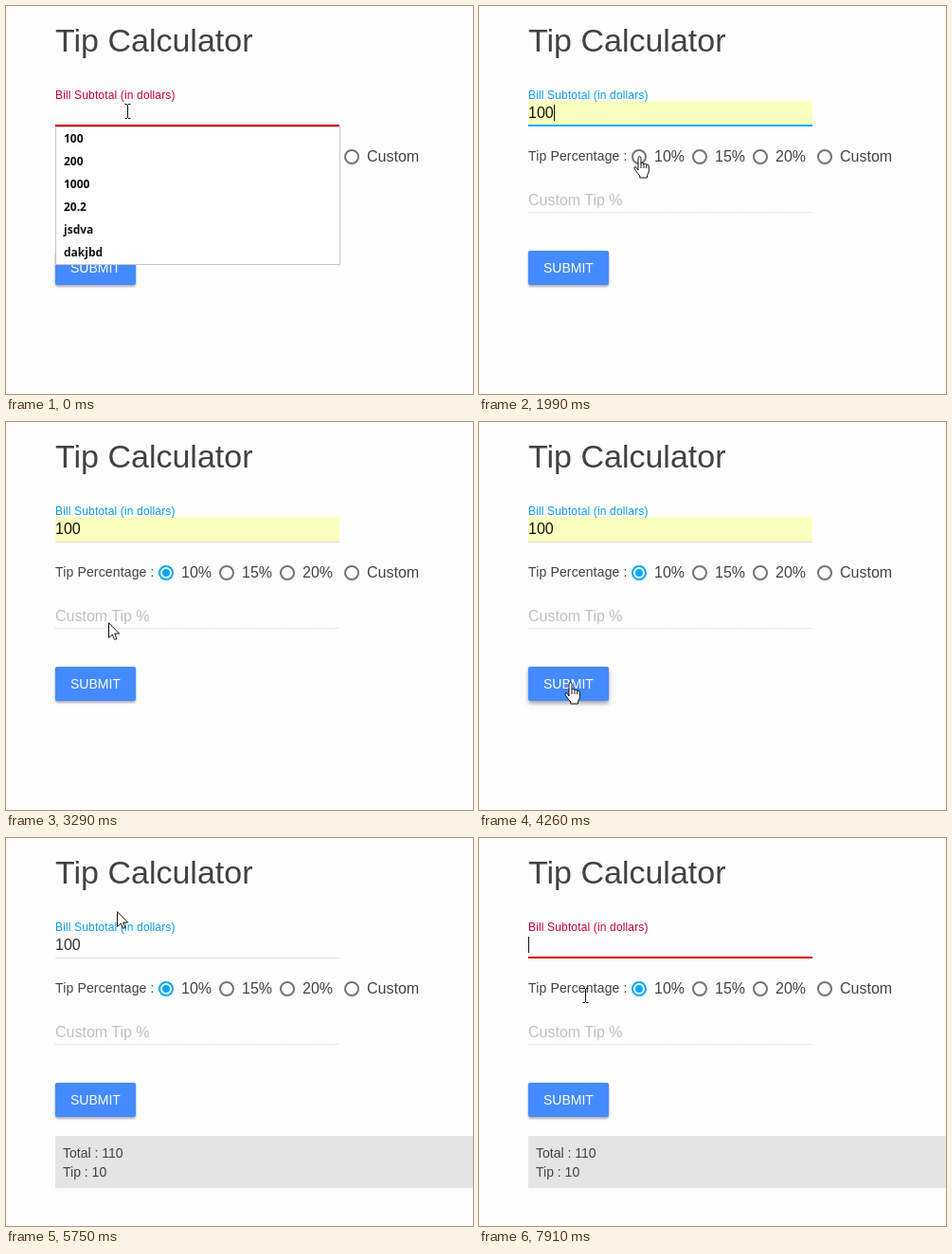
Animation of 493 by 409 pixels, one loop 8 s. Source, as an HTML page:

```html
<!DOCTYPE html>
<html lang="en">
<head>
<meta charset="utf-8">
<title>Tip Calculator</title>
<style>
  html, body { margin: 0; width: 100%; height: 100%; overflow: hidden; background: #fdfdfd; }
  svg { display: block; font: 16px "Liberation Sans", Arial, sans-serif; fill: #424242; }
  .title { font-size: 34px; }
  .label { font-size: 12px; letter-spacing: .15px; }
  .small { font-size: 14px; }
  .spaced { letter-spacing: .15px; }
  .hint { fill: #bfbfbf; }
  .menu { font: bold 12px "Open Sans", "Noto Sans", sans-serif; fill: #111; }
  .button { fill: #448aff; filter: drop-shadow(0 2px 1px #0004) drop-shadow(0 0 1px #0002); }
  .pressed { filter: drop-shadow(0 3px 2px #0004) drop-shadow(0 0 1px #0003); }
</style>
</head>
<body>
<svg id="stage" width="493" height="409" viewBox="0 0 493 409"></svg>
<script>
const LOOP = 8000, BLUE = '#03a9f4', RED = '#d50000';
const stage = document.getElementById('stage');

// Each track lists [start time, ...values]; a value holds until the next start.
const pointer = [
  [0, 'beam', 128, 111], [1450, 'beam', 140, 117], [1570, 'arrow', 154, 132], [1690, 'arrow', 165, 145],
  [1840, 'hand', 161, 152], [1990, 'hand', 163, 158], [2540, 'arrow', 146, 176], [2660, 'arrow', 128, 186],
  [2780, 'arrow', 117, 191], [2930, 'arrow', 114, 195], [3050, 'arrow', 111, 202], [3170, 'arrow', 109, 208],
  [3290, 'arrow', 108, 211], [3410, 'hand', 92, 280], [3560, 'hand', 90, 288], [3840, 'hand', 89, 275],
  [3990, 'hand', 90, 274], [4410, 'arrow', 96, 274], [4530, 'hand', 90, 274], [5210, 'hand', 85, 274],
  [5360, 'arrow', 52, 225], [5480, 'arrow', 40, 184], [5630, 'arrow', 85, 46], [5750, 'arrow', 117, 77],
  [5900, 'arrow', 129, 98], [6050, 'beam', 130, 111], [6170, 'beam', 129, 111], [7910, 'beam', 112, 166]
];
const labelColor = [[0, '#c4003c'], [930, '#3f86c4'], [1050, '#0b9ce6'], [7520, '#8a4090'], [7640, '#c4003c']];
const bar = [
  [0, RED, 52, 352], [930, '#2090c0', 52, 352], [1050, BLUE, 52, 352], [2270, BLUE, 110, 290],
  [2390, BLUE, 187, 199], [2540], [6850, BLUE, 132, 268], [7000, BLUE, 52, 352],
  [7520, '#8a4a70', 52, 352], [7640, RED, 52, 352]
];
const caret = [[0], [930, 79], [1450], [1840, 79], [2270], [6850, 79], [7000], [7520, 52]];
const menu = [
  [0, ['100', '200', '1000', '20.2', 'jsdva', 'dakjbd']], [930], [7250, ['100', '1000']], [7520]
];
const tracks = [pointer, labelColor, bar, caret, menu, [[4140], [4410], [4530], [460]]];
const times = [...new Set(tracks.flat().map(step => step[0]))].sort((a, b) => a - b);

const at = (track, t) => track.findLast(step => step[0] <= t).slice(1);
const rect = (x, y, w, h, fill, more = '') =>
  `<rect x="${x}" y="${y}" width="${w}" height="${h}" fill="${fill}" ${more}/>`;
const text = (x, y, s, cls = '', fill = '') =>
  `<text x="${x}" y="${y}" class="${cls}" ${fill && `style="fill:${fill}"`}>${s}</text>`;
const circle = (x, y, r, fill, stroke = 'none', width = 1) =>
  `<circle cx="${x}" cy="${y}" r="${r}" fill="${fill}" stroke="${stroke}" stroke-width="${width}"/>`;

const shapes = {
  arrow: '<path d="M.5 .7V16.5L4.2 13L6.6 18.4L9 17.4L6.7 12.1H11.6Z" fill="#fff" stroke="#111"/>',
  hand: `<path d="M5 15V2.5Q5 .7 6.5 .7T8 2.5V8.5Q8 7.3 9.4 7.3T11 9Q11 8 12.3 8T13.7 9.8Q13.8 9 15 9
    T16.3 11V16Q16.3 18 14.5 20.5V23H6.8V21Q4 18 2.5 15.5Q.5 13 1 12Q2 11 3.3 12.5Z
    M8 8.5V13M11 9V13M13.7 10V13" fill="#fff" stroke="#111" stroke-linejoin="round"/>`,
  beam: '<path d="M-2.5-7.5H0M1-7.5H3.5M.5-7V7M-2.5 7.5H0M1 7.5H3.5" fill="none" stroke="#111"/>'
};

function radios(checked, native) {
  const options = native
    ? [['10%', 172, 186], ['15%', 237, 252], ['20%', 303, 317], ['Custom', 372, 387]]
    : [['10%', 169, 185], ['15%', 233, 249], ['20%', 297, 313], ['Custom', 365, 381]];
  return options.map(([name, cx, tx], i) => {
    const on = checked && i === 0;
    const ring = native
      ? circle(cx, 157, 5.5, '#e4e4e4', '#a0a0a0') + (on ? circle(cx, 157, 3, '#505050') : '')
      : circle(cx, 159, 7, 'none', on ? BLUE : '#757575', 2) + (on ? circle(cx, 159, 4, BLUE) : '');
    return ring + text(tx, 164, name);
  }).join('');
}

function field(t, plain) {
  const filled = t >= 460 && t < 7520, autofill = t >= 460 && t < 4410;
  const selected = t >= 7000 && t < 7520;
  const [color, x1, x2] = at(bar, t), [caretX] = at(caret, t);
  return (autofill ? rect(52, 100, 300, 26, '#faffbd') : '')
    + rect(52, 126, 300, 1, '#dedede')
    + (color ? rect(x1, 125, x2 - x1, 2, color) : '')
    + (selected ? rect(52, 104, 27, 18, '#3390ff') : '')
    + (filled ? text(52, 118, '100', '', selected ? '#fff' : autofill ? '#111' : '#333') : '')
    + (plain ? text(52, 119, 'Bill Subtotal (in dollars)', 'hint')
             : text(52, 98, 'Bill Subtotal (in dollars)', 'label', at(labelColor, t)[0]))
    + (caretX ? rect(caretX, 104, 1, 17, '#111') : '');
}

function suggestions(t) {
  const [items] = at(menu, t);
  if (!items) return '';
  return rect(52.5, 127.5, 300, items.length * 24 + 1, '#fff', 'stroke="#c6c6c6"')
    + (t >= 460 && t < 930 ? rect(53, 128, 299, 24, '#cdcdcd') : '')
    + items.map((item, i) => text(61, 144 + i * 24, item, 'menu')).join('')
    + rect(52, 125, 300, 2, at(bar, t)[0]);
}

function draw(t) {
  const plain = t >= 4410 && t < 4530;
  const pressed = t >= 4140 && t < 4410;
  const [kind, x, y] = at(pointer, t);
  stage.innerHTML = text(52, 48, 'Tip Calculator', 'title')
    + field(t, plain)
    + text(52, 163, 'Tip Percentage :', 'small spaced')
    + radios(t >= 2270, plain)
    + text(52, 210, 'Custom Tip %', 'hint')
    + '<path d="M52 217.5H352" stroke="#d4d4d4" stroke-dasharray="1 1"/>'
    + rect(52, 258, 85, 36, '#448aff', `rx="2" class="button ${pressed ? 'pressed' : ''}"`)
    + text(68, 281, 'SUBMIT', 'small', '#fff')
    + (t >= 4410 ? rect(52, 314, 441, 55, '#e4e4e4')
      + text(60, 337, 'Total : 110', 'small') + text(60, 357, 'Tip : 10', 'small') : '')
    + suggestions(t)
    + `<g transform="translate(${x} ${y})">${shapes[kind]}</g>`;
}

let shown = -1;
function tick() {
  const t = performance.now() % LOOP;
  const step = times.findLast(time => time <= t);
  if (step !== shown) draw(shown = step);
  requestAnimationFrame(tick);
}
tick();
</script>
</body>
</html>
```
